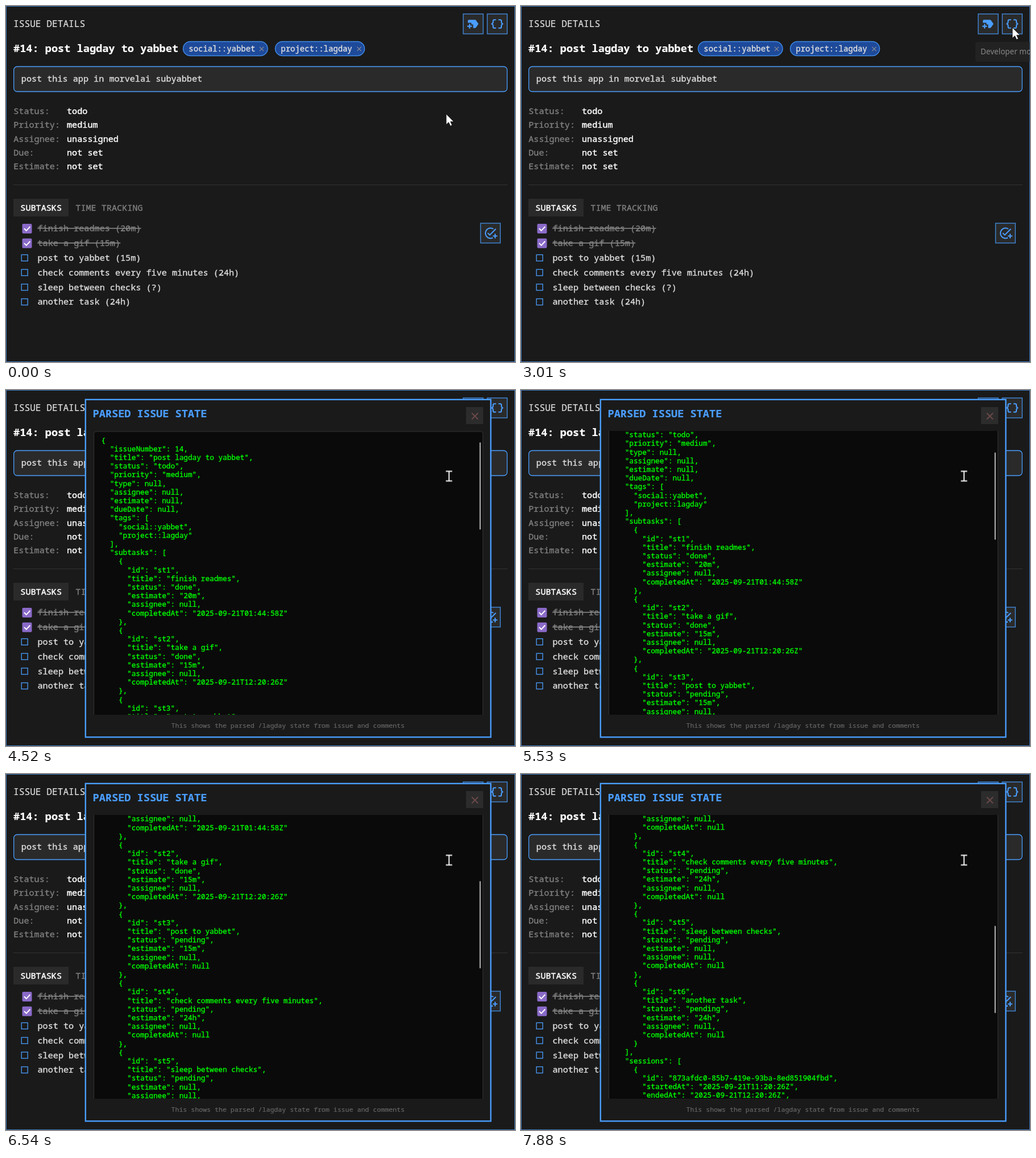
Recreate the animation shown at these times as an HTML page. Size 895x626 px, loop 8000 ms.

```html
<!DOCTYPE html>
<html lang="en">
<head>
<meta charset="utf-8">
<title>Issue details</title>
<style>
  @property --scroll { syntax: "<number>"; inherits: true; initial-value: 0; }

  html, body { margin: 0; width: 100%; height: 100%; overflow: hidden; background: #1a1a1a; }
  svg.stage { display: block; width: 100%; height: 100%; }
  text {
    --ink: #e0e0e0;
    font: 15.16px "Noto Sans Mono", monospace;
    fill: var(--ink); stroke: var(--ink); stroke-width: .35;
    white-space: pre;
  }

  .heading { font-size: 16.2px; stroke-width: .2; }
  .title { --ink: #fff; font-size: 18.6px; font-weight: 700; stroke-width: .2; }
  .blue { --ink: #4a9eff; }
  .value { --ink: #fff; stroke-width: .45; }
  .muted { --ink: #808080; }
  .done { --ink: #808080; text-decoration: line-through; }
  .tag { font-size: 13.95px; }
  .code text { --ink: #0f0; font-size: 12.72px; }
  .foot { --ink: #666; font-size: 11.6px; stroke-width: .2; }
  .tip text { font: 13.5px "Noto Sans", sans-serif; stroke: none; }

  .btn { fill: #2a2a2a; stroke: #3f83d0; stroke-width: 1.5; }
  .pill { fill: #1e4a9a; stroke: #3f8ae6; stroke-width: 1.5; }
  .x { fill: none; stroke: #8c8c94; stroke-width: 1.3; }
  .icon { fill: #4a9eff; }
  .line { fill: none; stroke: #4a9eff; stroke-width: 2; }
  .box { fill: none; stroke: #4a9eff; stroke-width: 1.3; }

  .modal, .tip, .thumb, .pointer, .arrow, .beam { animation: 8s step-end infinite; }
  .modal { animation-name: open, scroll; }
  .tip { animation-name: tip; }
  .thumb { animation-name: thumb; transform: translateY(calc(var(--scroll) * .323px)); }
  .code { transform: translateY(calc(var(--scroll) * -1px)); }
  .pointer { animation-name: move; }
  .arrow { animation-name: arrow; }
  .beam { animation-name: thumb; }

  @keyframes open { 0% { opacity: 0; } 39.75%, 100% { opacity: 1; } }
  @keyframes tip {
    0% { opacity: 0; }
    37.625% { opacity: .55; }
    39.75% { opacity: 1; }
    50.125%, 100% { opacity: 0; }
  }
  @keyframes thumb { 0% { opacity: 0; } 52.25%, 100% { opacity: 1; } }
  @keyframes arrow { 0% { opacity: 1; } 52.25%, 100% { opacity: 0; } }
  @keyframes move {
    0% { transform: translate(774px, 190px); }
    16.75% { transform: translate(777px, 183px); }
    18.875% { transform: translate(796px, 142px); }
    21% { transform: translate(822px, 95px); }
    23.125% { transform: translate(845px, 58px); }
    25.125% { transform: translate(860px, 36px); }
    27.25% { transform: translate(865px, 27px); }
    29.375% { transform: translate(849px, 23px); }
    31.375% { transform: translate(865px, 31px); }
    37.625% { transform: translate(864px, 38px); }
    50.125% { transform: translate(842px, 68px); }
    52.25% { transform: translate(812px, 112px); }
    54.375% { transform: translate(788px, 142px); }
    56.5%, 100% { transform: translate(779px, 151.4px); }
  }
  @keyframes scroll {
    0% { --scroll: 0; }
    69.125% { --scroll: 55; }
    71.25% { --scroll: 150; }
    73.375% { --scroll: 232; }
    75.375% { --scroll: 277.5; }
    77.5% { --scroll: 289; }
    79.625% { --scroll: 295.5; }
    81.75% { --scroll: 298; }
    87.875% { --scroll: 340; }
    90% { --scroll: 418; }
    92.125% { --scroll: 474; }
    94.25% { --scroll: 509; }
    96.375% { --scroll: 531; }
    98.5%, 100% { --scroll: 541.6; }
  }
</style>
</head>
<body>
<svg class="stage" viewBox="0 0 895 626" preserveAspectRatio="none">
  <defs>
    <clipPath id="view"><rect x="153" y="72" width="687" height="499"/></clipPath>
    <path id="brace" d="M10 5H7a2 2 0 0 0-2 2v2a3 3 0 0 1-3 3 3 3 0 0 1 3 3v2a2 2 0 0 0 2 2h3"/>
    <path id="cross" d="M-3.6-3.6 3.6 3.6M3.6-3.6-3.6 3.6"/>
  </defs>

  <rect x=".5" y=".5" width="894" height="625" fill="#1a1a1a" stroke="#3a78c0"/>
  <text class="heading" x="13" y="37">ISSUE DETAILS</text>

  <rect class="btn" x="804" y="14" width="35" height="35"/>
  <path class="icon" transform="translate(809 19) scale(1.04)" d="M21 12l-4.4 6.2c-.4.5-1 .8-1.6.8h-3v-6H9v-3H3V7c0-1.1.9-2 2-2h10c.7 0 1.3.3 1.6.8zM10 15H7v-3H5v3H2v2h3v3h2v-3h3z"/>
  <rect class="btn" x="846.3" y="14" width="35" height="35"/>
  <g class="line" transform="translate(851.3 19) scale(1.04)">
    <use href="#brace"/>
    <use href="#brace" transform="translate(24 0) scale(-1 1)"/>
  </g>

  <text class="title" x="13" y="81">#14: post lagday to yabbet</text>
  <rect class="pill" x="311.5" y="62.5" width="148.5" height="25" rx="12.5"/>
  <text class="tag" x="321.3" y="80">social::yabbet</text>
  <use href="#cross" class="x" x="449.5" y="75.5"/>
  <rect class="pill" x="473.5" y="62.5" width="157" height="25" rx="12.5"/>
  <text class="tag" x="483.3" y="80">project::lagday</text>
  <use href="#cross" class="x" x="621" y="75.5"/>

  <rect x="13.7" y="106.5" width="867.5" height="44" rx="6" fill="#2a2a2a" stroke="#4a9eff" stroke-width="1.3"/>
  <text x="26.8" y="133">post this app in morvelai subyabbet</text>

  <g id="fields"></g>
  <path d="M13 314.5H882" stroke="#333"/>

  <rect x="13" y="339" width="97" height="31" fill="#2a2a2a"/>
  <text class="value" x="25.3" y="360">SUBTASKS</text>
  <text class="muted" x="122.3" y="360">TIME TRACKING</text>
  <g id="tasks"></g>

  <rect class="btn" x="834.5" y="382" width="34.7" height="34.7"/>
  <g transform="translate(840 387.5)">
    <path class="line" d="M17 4.5A9 9 0 1 0 16 20"/>
    <path class="line" d="M7 11.6l3.6 3.6L21.3 4.5"/>
    <path class="line" d="M20 13v8M16 17h8"/>
  </g>

  <g class="modal">
    <rect x="139.8" y="16.8" width="712.6" height="593.6" fill="#1a1a1a" stroke="#4a9eff" stroke-width="2.4"/>
    <text class="title blue" x="152.5" y="48">PARSED ISSUE STATE</text>
    <rect x="809" y="30" width="30" height="30" fill="#2c2c2c"/>
    <path d="M819 40.5l11 11M830 40.5l-11 11" stroke="#6b4848" stroke-width="2"/>
    <g clip-path="url(#view)">
      <g class="code" id="code">
        <rect x="154.5" y="73" width="684" height="1546" rx="4" fill="#0a0a0a" stroke="#333"/>
      </g>
    </g>
    <rect class="thumb" x="832.5" y="92" width="2.5" height="153.5" rx="1.2" fill="#999"/>
    <text class="foot" x="290.5" y="594">This shows the parsed /lagday state from issue and comments</text>
  </g>

  <g class="tip">
    <rect x="799" y="63" width="130" height="35" rx="4" fill="#2a2a2a"/>
    <text x="808" y="85">Developer mode</text>
  </g>

  <g class="pointer">
    <path class="arrow" d="M0 0V18.5L4.3 14.5 7.4 21 10.4 19.6 7.5 13.3H13.3Z" fill="#fff" stroke="#111" stroke-width=".8"/>
    <path class="beam" d="M-5.5-8.5H5.5M0-8.5V8.5M-5.5 8.5H5.5" fill="none" stroke="#fff" stroke-width="1.8"/>
  </g>
</svg>

<script>
  const $ = id => document.getElementById(id);

  function add(parent, tag, attrs, label) {
    const el = document.createElementNS(parent.namespaceURI, tag);
    for (const key in attrs) el.setAttribute(key, attrs[key]);
    if (label) el.textContent = label;
    parent.append(el);
  }

  const fields = {
    Status: "todo", Priority: "medium", Assignee: "unassigned",
    Due: "not set", Estimate: "not set"
  };
  Object.entries(fields).forEach(([name, value], i) => {
    const y = 189.8 + i * 24.4;
    add($("fields"), "text", { class: "muted", x: 13.2, y }, name + ":");
    add($("fields"), "text", { class: "value", x: 107, y }, value);
  });

  const tasks = [
    ["finish readmes", "20m", "2025-09-21T01:44:58Z"],
    ["take a gif", "15m", "2025-09-21T12:20:26Z"],
    ["post to yabbet", "15m"],
    ["check comments every five minutes", "24h"],
    ["sleep between checks", null],
    ["another task", "24h"]
  ];
  tasks.forEach(([title, estimate, done], i) => {
    const g = $("tasks"), y = 391.3 + i * 25.8;
    if (done) {
      add(g, "rect", { x: 28.5, y: y - 8.3, width: 17, height: 17, rx: 2, fill: "#8a6ac8" });
      add(g, "path", { d: `M32 ${y}l3.7 3.8 6.7-7.2`, fill: "none", stroke: "#fff", "stroke-width": 2 });
    } else {
      add(g, "rect", { class: "box", x: 27.2, y: y - 5.5, width: 11, height: 11 });
    }
    add(g, "text", { class: done ? "done" : "open", x: 55.5, y: y + 5 }, `${title} (${estimate || "?"})`);
  });

  const state = {
    issueNumber: 14,
    title: "post lagday to yabbet",
    status: "todo",
    priority: "medium",
    type: null,
    assignee: null,
    estimate: null,
    dueDate: null,
    tags: ["social::yabbet", "project::lagday"],
    subtasks: tasks.map(([title, estimate, done = null], i) => ({
      id: "st" + (i + 1), title,
      status: done ? "done" : "pending",
      estimate, assignee: null, completedAt: done
    })),
    sessions: [{
      id: "873afdc0-85b7-419e-93ba-8ed851904fbd",
      startedAt: "2025-09-21T11:20:26Z",
      endedAt: "2025-09-21T12:20:26Z",
      note: null
    }]
  };
  JSON.stringify(state, null, 2).split("\n").forEach((line, i) => {
    const label = line.trimStart(), indent = line.length - label.length;
    add($("code"), "text", { x: 167.4 + indent * 7.62, y: 92.6 + i * 15.2 }, label);
  });
</script>
</body>
</html>
```
